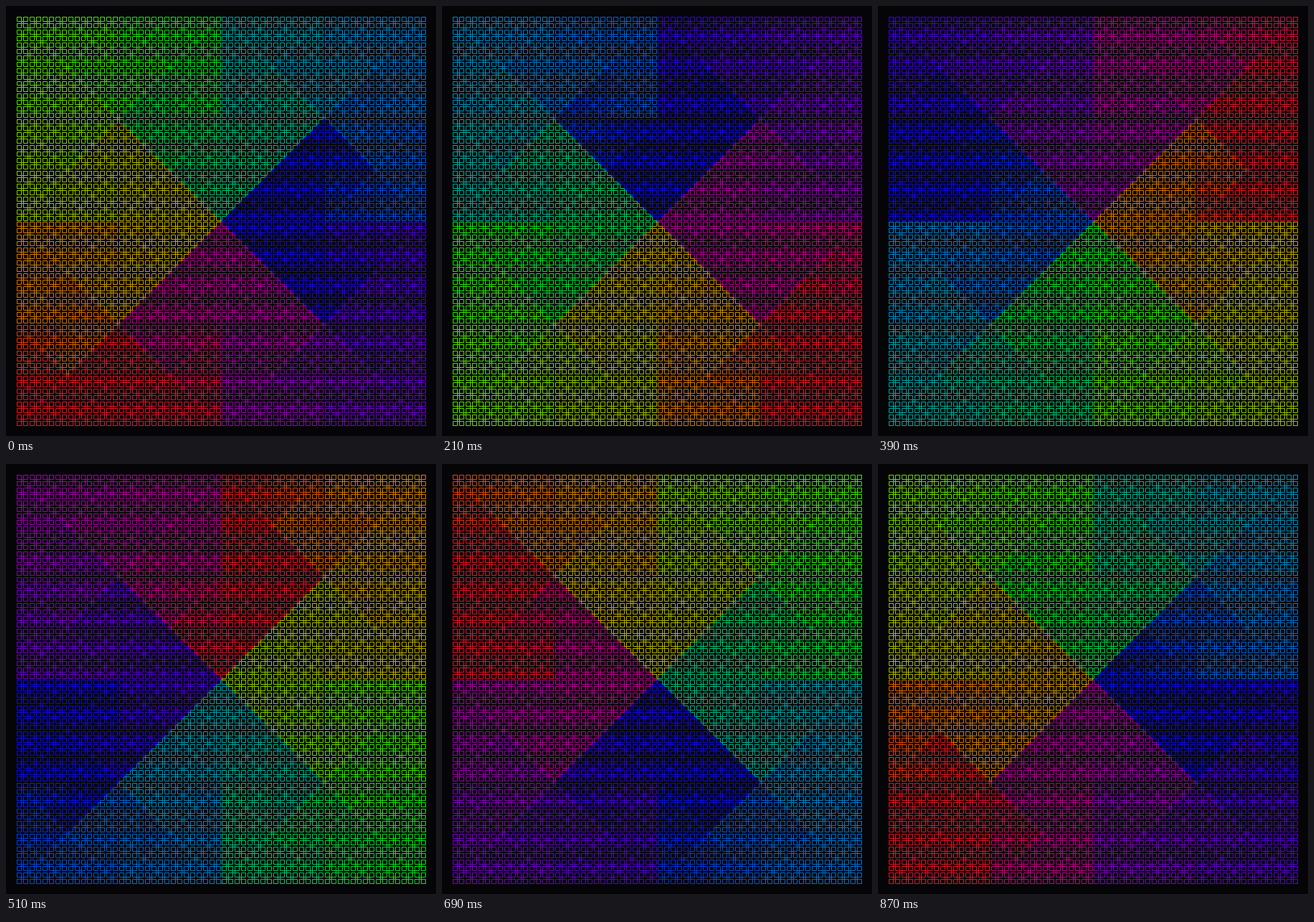
An HTML page with a canvas that plays this animation: 600 px wide and 600 px high, repeating every 900 ms.

```html
<!DOCTYPE html>
<html lang="en">
<head>
<meta charset="utf-8">
<title>Sierpinski curve colour cycle</title>
<style>
  html, body { margin: 0; width: 100%; height: 100%; overflow: hidden; background: #050507; }
  canvas { display: block; width: 600px; height: 600px; }
</style>
</head>
<body>
<canvas id="stage" width="600" height="600"></canvas>
<script>
const ctx = document.getElementById('stage').getContext('2d');

const SIZE = 600, MARGIN = 15, CELLS = 64;
const STEP_MS = 30, STEPS = 30, CHUNK = 32;

// Each cell is a box two units wide, followed by a gap of one unit.
const BOX = 2, GAP = 1;
const UNIT = (SIZE - 2 * MARGIN) / (CELLS * (BOX + GAP) - GAP);

// Colour stops: place on the loop, red, green, blue.
const STOPS = [
  [0.00, 186, 172, 0], [0.05, 160, 190, 0], [0.10, 105, 220, 0],
  [0.15, 55, 232, 0], [0.19, 0, 232, 25], [0.25, 0, 200, 110],
  [0.31, 0, 168, 165], [0.37, 0, 130, 205], [0.44, 0, 80, 225],
  [0.47, 8, 12, 235], [0.525, 22, 5, 235], [0.56, 70, 0, 222],
  [0.64, 118, 0, 205], [0.71, 172, 0, 165], [0.79, 195, 0, 135],
  [0.815, 228, 18, 45], [0.88, 230, 22, 30], [0.90, 218, 98, 0],
  [0.94, 210, 130, 0], [1.00, 186, 172, 0]
];

function colorAt(place) {
  const u = place % 1;
  const i = STOPS.findIndex(s => s[0] > u);
  const [from, ...a] = STOPS[i - 1], [to, ...b] = STOPS[i];
  const f = (u - from) / (to - from);
  return `rgb(${a.map((v, k) => Math.round(v + (b[k] - v) * f)).join()})`;
}

const midpoint = (p, q) => [(p[0] + q[0]) / 2, (p[1] + q[1]) / 2];

const points = [];

// Adds the box corner of the cell at center that lies next to a grid corner.
function addCorner(corner, center) {
  points.push([0, 1].map(i => {
    const cell = center[i] - 0.5;
    const units = cell * (BOX + GAP) + (corner[i] > center[i] ? BOX : 0);
    return Math.round(MARGIN + units * UNIT) + 0.5;
  }));
}

// Walks a right triangle from p to q, the ends of its hypotenuse.
function walk(p, q, apex, depth) {
  if (depth === 0) {
    addCorner(p, apex);
    addCorner(q, apex);
    return;
  }
  const m = midpoint(p, q);
  walk(p, apex, m, depth - 1);
  walk(apex, q, m, depth - 1);
}

function buildCurve() {
  const half = CELLS / 2, depth = 2 * Math.log2(half);
  const square = [[half, half], [0, half], [0, 0], [half, 0]];
  // Each quadrant is the first one turned a quarter further about the centre.
  const turn = ([x, y], n) => n === 0 ? [x, y] : turn([CELLS - y, x], n - 1);
  for (let n = 0; n < 4; n++) {
    const corners = square.map(c => turn(c, n));
    const center = midpoint(corners[0], corners[2]);
    corners.forEach((c, i) => walk(c, corners[(i + 1) % 4], center, depth));
  }
}

function draw(step) {
  ctx.fillStyle = '#050507';
  ctx.fillRect(0, 0, SIZE, SIZE);
  ctx.lineWidth = 1;
  ctx.lineCap = 'square';
  const total = points.length;
  for (let start = 0; start < total; start += CHUNK) {
    ctx.strokeStyle = colorAt((start + CHUNK / 2) / total + step / STEPS);
    ctx.beginPath();
    for (let i = start; i <= start + CHUNK; i++) ctx.lineTo(...points[i % total]);
    ctx.stroke();
  }
}

let shown = -1;
function tick() {
  const step = Math.floor(performance.now() / STEP_MS) % STEPS;
  if (step !== shown) draw(shown = step);
  requestAnimationFrame(tick);
}

buildCurve();
tick();
</script>
</body>
</html>
```
